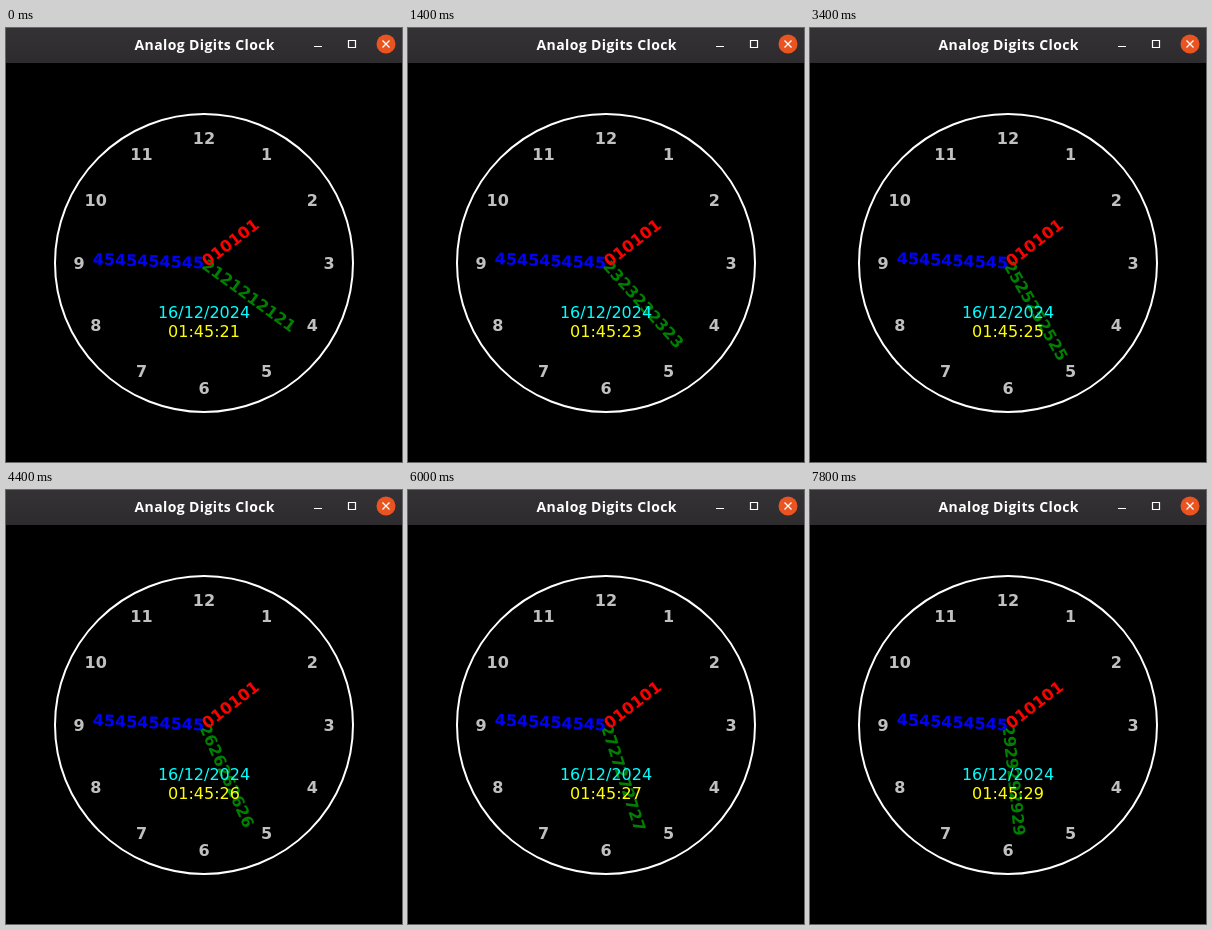
An HTML page for the animation above (8000 ms loop, 396 by 434 pixels).

```html
<!DOCTYPE html>
<html lang="en">
<head>
<meta charset="utf-8">
<title>Analog Digits Clock</title>
<style>
  html, body { margin: 0; width: 100%; height: 100%; overflow: hidden; background: #000; }
  svg { display: block; width: 396px; height: 434px; }
  text { font: 16px "DejaVu Sans", sans-serif; text-anchor: middle; }
  .bold text { font-weight: bold; }
  .title { font: bold 14px "Open Sans", sans-serif; fill: #fff; }
</style>
</head>
<body>
<svg viewBox="0 0 396 434">
  <defs>
    <linearGradient id="bar" x2="0" y2="1">
      <stop offset="0" stop-color="#343234"/>
      <stop offset="1" stop-color="#2d2b2d"/>
    </linearGradient>
  </defs>
  <rect width="396" height="434"/>
  <rect width="396" height="35" fill="url(#bar)"/>
  <text class="title" x="198.5" y="22" textLength="140">Analog Digits Clock</text>
  <g fill="none" stroke="#fff">
    <path d="M308 18.5h8M342.5 12.5h7v7h-7z" stroke-width="1.2"/>
    <circle cx="380" cy="16" r="9.5" fill="#e95420" stroke="none"/>
    <path d="M376.5 12.5l7 7m0-7l-7 7" stroke-width="1.3"/>
  </g>
  <circle cx="198" cy="235" r="149" fill="none" stroke="#fff" stroke-width="2"/>
  <g id="dial" class="bold" fill="#c0c0c0"></g>
  <g id="hands" class="bold"></g>
  <text x="198" y="290" fill="#0ff">16/12/2024</text>
  <text id="time" x="198" y="309" fill="#ff0"></text>
</svg>
<script>
const CX = 198, CY = 235, DROP = 5.5;
const LOOP = 8000, FIRST_TICK = 400;
const HOUR = 1, MINUTE = 45, START = 21;
const $ = id => document.getElementById(id);
const pad = n => String(n).padStart(2, '0');

function addText(parent, attrs, content = '') {
  const el = document.createElementNS('http://www.w3.org/2000/svg', 'text');
  for (const key in attrs) el.setAttribute(key, attrs[key]);
  el.textContent = content;
  return parent.appendChild(el);
}

for (let n = 1; n <= 12; n++) {
  const a = n * Math.PI / 6;
  addText($('dial'), {
    x: CX + 125 * Math.sin(a),
    y: CY - 125 * Math.cos(a) + DROP
  }, n);
}

const makeHand = fill => addText($('hands'), { fill, y: DROP });
const second = makeHand('#008000');
const minute = makeHand('#0000ff');
const hour = makeHand('#ff0000');

// Digits always read left to right, so hands on the left half end at the centre.
function setHand(el, value, repeats, angle) {
  const left = angle > 180;
  el.textContent = pad(value).repeat(repeats);
  el.style.textAnchor = left ? 'end' : 'start';
  el.setAttribute('transform', `translate(${CX} ${CY}) rotate(${angle - (left ? 270 : 90)})`);
}

let shown;
function draw(now) {
  const t = now % LOOP;
  const s = START + Math.floor((t - FIRST_TICK) / 1000) + 1;
  if (s !== shown) {
    shown = s;
    const m = MINUTE + s / 60;
    setHand(hour, HOUR, 3, (HOUR + m / 60) * 30);
    setHand(minute, MINUTE, 5, m * 6);
    setHand(second, s, 5, s * 6);
    $('time').textContent = [HOUR, MINUTE, s].map(pad).join(':');
  }
}

function frame() {
  draw(performance.now());
  requestAnimationFrame(frame);
}
frame();
</script>
</body>
</html>
```
